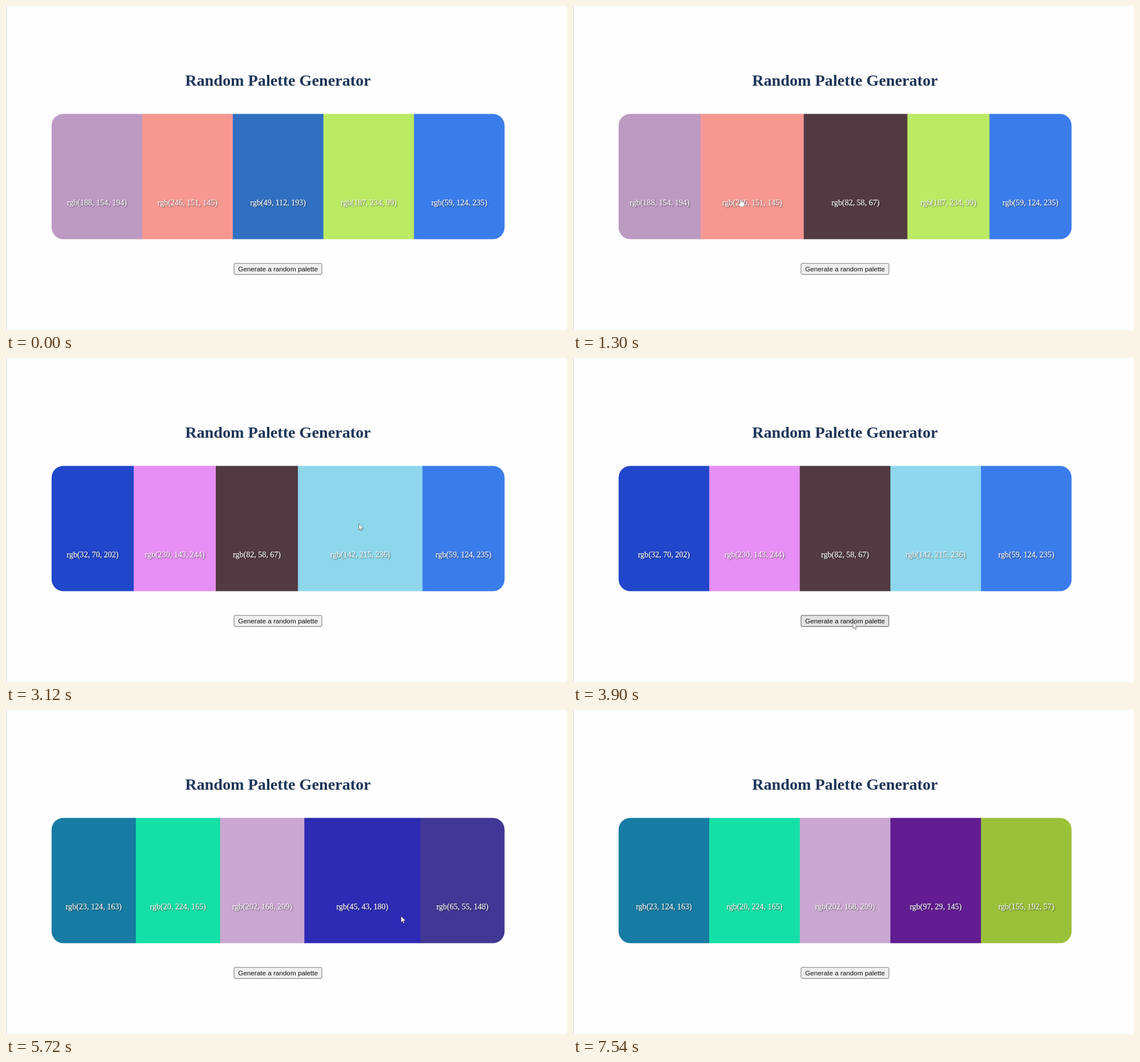
Write an HTML page that moves like this. It is 984 by 569 pixels and loops after 8.06 s.

```html
<!DOCTYPE html>
<html lang="en">
<head>
<meta charset="utf-8">
<title>Random Palette Generator</title>
<style>
  html, body { margin: 0; width: 100%; height: 100%; overflow: hidden; background: #fefefe; }
  svg { display: block; width: 984px; height: 569px; }
  .serif { font-family: "Liberation Serif", "Times New Roman", serif; text-anchor: middle; }
  .title { font-size: 28.2px; font-weight: 700; fill: #1d3557; }
  .label { font-size: 14.06px; fill: #fff; stroke: #fff; stroke-width: .25px; text-shadow: 1px 1px 2px rgba(0, 0, 0, .45); }
  .button { font: 11.71px "Liberation Sans", Arial, sans-serif; text-anchor: middle; fill: #111; }
</style>
</head>
<body>
<svg viewBox="0 0 984 569">
  <defs><clipPath id="card"><rect x="80" y="189.5" width="794.5" height="220" rx="20.5"/></clipPath></defs>
  <rect width="984" height="569" fill="#fefefe"/>
  <rect width="1" height="569" fill="#d2d2d2"/>
  <text class="serif title" x="477" y="140">Random Palette Generator</text>
  <g id="bars" clip-path="url(#card)"></g>
  <g id="labels"></g>
  <rect id="button" x="400" y="452" width="154" height="19.5" rx="2"/>
  <text class="button" x="477.1" y="465.6">Generate a random palette</text>
  <g id="cursor" fill="#fff" stroke="#222" stroke-width=".6" stroke-linejoin="round">
    <path id="arrow" d="M0 0V11.2L2.6 8.8L4.3 12.7L6.1 11.9L4.4 8.1H7.9Z"/>
    <path id="hand" stroke="#777" d="M-1 1Q0-.6 1 1V5.4Q2 0 3 5.2Q4 4 5 5.6Q6.4 4.8 6.6 6.6V10Q6.4 12 5 13.6H-.6Q-2.6 11.4-4 8.6Q-3.6 7-1 9Z"/>
  </g>
</svg>
<script>
const LOOP = 8060, STEP = 130, FADE = 300;
const LEFT = 80, TOP = 189.5, BOTTOM = 409.5, BASE = 144, EXTRA = 74.5;
const $ = id => document.getElementById(id);
const mix = (a, b, k) => a + (b - a) * k;
const rgb = c => `rgb(${c.map(Math.round).join(", ")})`;

const first = [[188, 154, 194], [246, 151, 145], [49, 112, 193], [187, 234, 99], [59, 124, 235]];
const fresh = [[23, 124, 163], [20, 224, 165], [202, 168, 209], [45, 43, 180], [65, 55, 148]];

// A click recolours the bar under the pointer; on the button it recolours them all.
const clicks = [
  { at: 770, to: [82, 58, 67] },
  { at: 1500, to: [230, 143, 244] },
  { at: 2099, to: [32, 70, 202] },
  { at: 2850, to: [142, 215, 236] },
  { at: 4160 },
  { at: 5890, to: [155, 192, 57] },
  { at: 6600, to: [97, 29, 145] }
];

// Key points of the pointer: time, x, y
const stops = [
  [130, 472, 556], [520, 478, 340], [1082, 478, 325], [1300, 294, 339], [1700, 270, 330],
  [2080, 122, 309], [2300, 122, 309], [2700, 600, 293], [3120, 619, 291], [3600, 491, 464],
  [5430, 491, 464], [5845, 780, 318], [6370, 596.3, 286.5], [7050, 606, 304], [7420, 596, 545]
];

// cubic-bezier(.25, .1, .25, 1)
function ease(x) {
  if (x <= 0) return 0;
  if (x >= 1) return 1;
  let lo = 0, hi = 1;
  for (let i = 0; i < 20; i++) {
    const s = (lo + hi) / 2, r = 1 - s;
    if (.75 * r * s + s ** 3 < x) lo = s; else hi = s;
  }
  const r = 1 - lo;
  return .3 * r * r * lo + 3 * r * lo * lo + lo ** 3;
}

function pointer(t) {
  const n = stops.findIndex(s => s[0] >= t);
  if (n < 1) return null;
  const [t0, x0, y0] = stops[n - 1], [t1, x1, y1] = stops[n];
  const k = (t - t0) / (t1 - t0);
  return [mix(x0, x1, k), mix(y0, y1, k)];
}

const hovers = [];

function layout(t) {
  let share = first.map(() => .2);
  for (const { at, bar } of hovers) {
    if (at > t) break;
    const k = ease((t - at) / FADE);
    share = share.map((s, i) => mix(s, bar < 0 ? .2 : +(i === bar), k));
  }
  let x = LEFT;
  return share.map(s => {
    const box = { x, w: BASE + EXTRA * s };
    x += box.w;
    return box;
  });
}

// Follow the pointer once to learn which bar it is over, and when.
let over = -1;
for (let t = 0; t < LOOP; t++) {
  const tip = pointer(t);
  const inside = tip && tip[1] > TOP && tip[1] < BOTTOM;
  const bar = inside ? layout(t).findIndex(b => tip[0] >= b.x && tip[0] < b.x + b.w) : -1;
  if (bar !== over) hovers.push({ at: t, bar });
  over = bar;
  for (const c of clicks) if (c.at === t) c.bar = bar;
}

function colours(t) {
  let shown = first, named = first;
  for (const { at, to, bar } of clicks) {
    if (t < at) break;
    const k = ease((t - at) / FADE);
    named = named.map((c, i) => to ? (i === bar ? to : c) : fresh[i]);
    shown = shown.map((c, i) => c.map((v, j) => mix(v, named[i][j], k)));
  }
  return { shown, named };
}

function add(parent, tag, attrs) {
  const el = document.createElementNS("http://www.w3.org/2000/svg", tag);
  set(el, attrs);
  return parent.appendChild(el);
}

function set(el, attrs) {
  for (const name in attrs) el.setAttribute(name, attrs[name]);
}

const bars = first.map(() => add($("bars"), "rect", { y: 189, height: 221 }));
const labels = first.map(() => add($("labels"), "text", { class: "serif label", y: 349.7 }));

function draw(t) {
  const { shown, named } = colours(t);
  const tip = pointer(t);
  const near = (x, y, dx, dy) => tip && Math.abs(tip[0] - x) < dx && Math.abs(tip[1] - y) < dy;
  let onText = false;

  layout(t).forEach(({ x, w }, i) => {
    const mid = x + w / 2;
    set(bars[i], { x, width: w + .6, fill: rgb(shown[i]) });
    set(labels[i], { x: mid });
    labels[i].textContent = rgb(named[i]);
    onText = onText || near(mid, 345, 53, 8);
  });

  const onButton = near(477, 462, 77, 10);
  set($("button"), { fill: onButton ? "#e3e3e3" : "#efefef", stroke: onButton ? "#555" : "#767676" });

  $("cursor").style.display = tip ? "" : "none";
  if (tip) set($("cursor"), { transform: `translate(${tip})` });
  $("arrow").style.display = onText ? "none" : "";
  $("hand").style.display = onText ? "" : "none";
}

const begun = performance.now();
function tick() {
  const t = (performance.now() - begun) % LOOP;
  draw(Math.floor(t / STEP) * STEP);
  requestAnimationFrame(tick);
}
tick();
</script>
</body>
</html>
```
